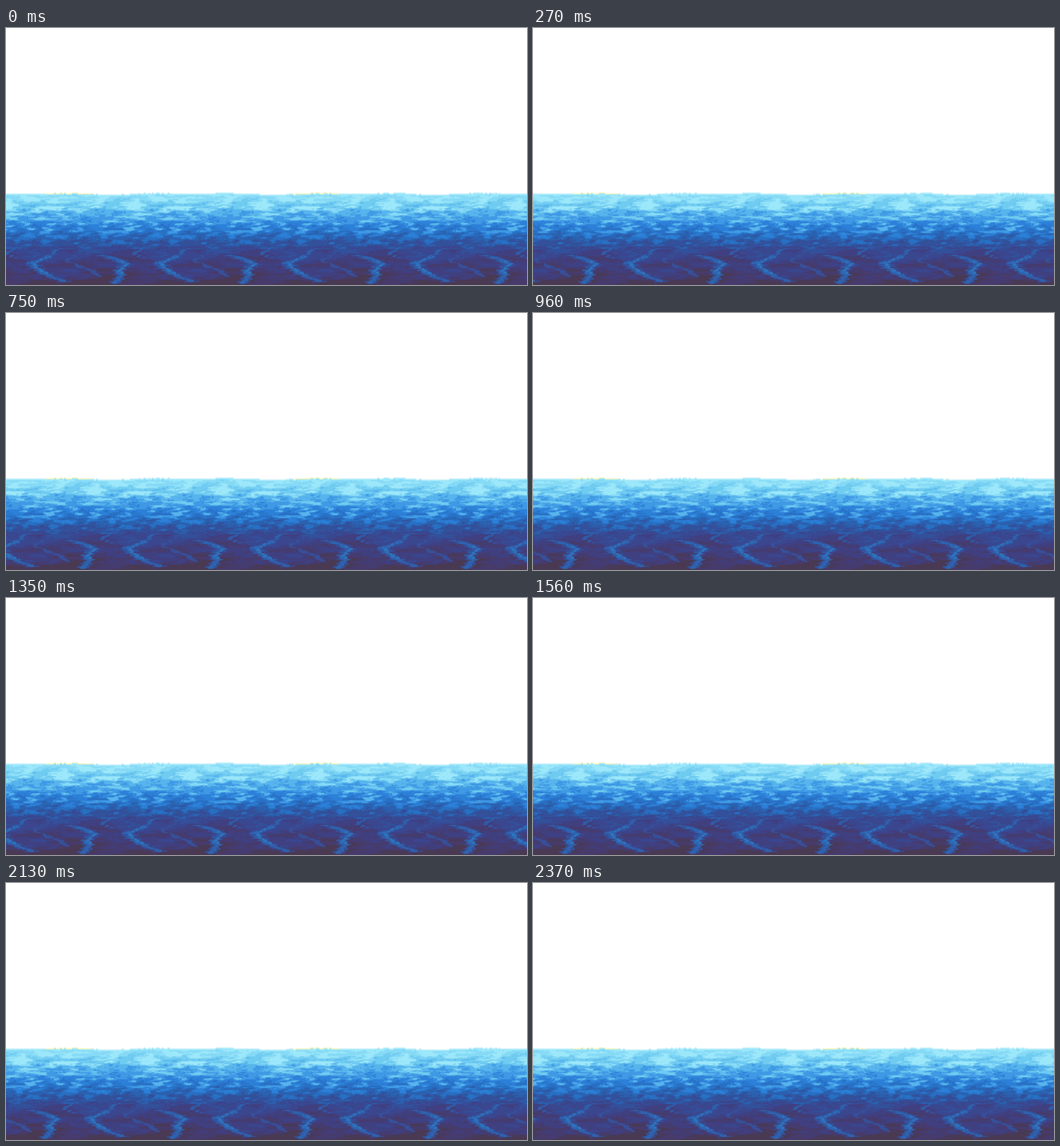
These frames come from a looping animation (700x346 px, 2.4 s). An HTML page with a canvas:

```html
<!DOCTYPE html>
<html lang="en">
<head>
<meta charset="utf-8">
<title>Sea</title>
<style>
  html, body { margin: 0; width: 100%; height: 100%; overflow: hidden; background: #fff; }
  canvas { display: block; width: 700px; height: 346px; }
</style>
</head>
<body>
<canvas id="sea" width="522" height="258"></canvas>
<script>
const W = 522, H = 258, TOP = 165, TILE = 128, ROWS = 93;
const LOOP = 2400, STEP = 30;
const ctx = document.getElementById('sea').getContext('2d');

// Shades from the surface down, each with the row where it is centred
const shades = ['#9ce8fa', '#86daf6', '#70cbf1', '#58b4ec', '#3f99e4', '#2c80d8',
  '#2870c4', '#2b60ae', '#33509b', '#3a468e', '#403f80', '#463b6b', '#493953'];
const centres = [-4, 5, 13, 20, 27, 34, 40, 45, 50, 58, 70, 84, 99];

// Bands of water: first row, last row, tiles travelled per loop
const bands = [[0, 24, 1], [24, 41, 2], [41, 54, 3], [54, ROWS, 4]];

function hash(x, y, seed) {
  const v = Math.sin(x * 127.1 + y * 311.7 + seed * 74.7) * 43758.5453;
  return v - Math.floor(v);
}

// Value noise that repeats every tile
function noise(x, y, cw, ch, seed) {
  const n = TILE / cw, u = x / cw, v = y / ch;
  const i = Math.floor(u), j = Math.floor(v);
  const ease = t => t * t * (3 - 2 * t);
  const a = ease(u - i), b = ease(v - j);
  const at = (p, q) => hash(((p % n) + n) % n, q, seed);
  const mix = (p, q, t) => p + (q - p) * t;
  return mix(mix(at(i, j), at(i + 1, j), a), mix(at(i, j + 1), at(i + 1, j + 1), a), b);
}

function depth(y) {
  let k = 0;
  while (k < centres.length - 2 && y >= centres[k + 1]) k++;
  return k + (y - centres[k]) / (centres[k + 1] - centres[k]);
}

function shadeAt(x, y) {
  const row = x + 5 * (hash(0, y, 6) - 0.5);
  let d = depth(y) + (noise(row, y, 4, 1.3, 1) - 0.5) * 0.8;
  if (y < 57) {
    // Small flecks of light that trail off sideways
    const bend = row + 6 * noise(x, y, 16, 4, 2) + y * 0.8;
    const fleck = noise(bend, y, 8, 2.4, 3) + (noise(row, y, 4, 1.2, 7) - 0.5) * 0.35;
    if (fleck > 0.7) d -= y < 40 ? 2 : 1.6;
    else if (fleck > 0.6) d -= 0.8;
    else if (fleck < 0.2) d += 0.7;
  } else {
    const bend = row + 14 * Math.sin(y / 7) + y;
    d += (noise(bend, y, 32, 6, 5) - 0.5) * 2.6 + (noise(bend, y, 8, 2, 8) - 0.5) * 1.4;
  }
  return Math.max(0, Math.min(shades.length - 1, Math.round(d)));
}

function makeTile() {
  const tile = document.createElement('canvas');
  tile.width = TILE;
  tile.height = ROWS;
  const g = tile.getContext('2d');
  for (let y = 0; y < ROWS; y++)
    for (let x = 0; x < TILE; x++) {
      g.fillStyle = shades[shadeAt(x, y)];
      g.fillRect(x, y, 1, 1);
    }

  // A ragged streak of dashes through points of [x, y, width]
  function streak(points, colour, seed, thick = 1) {
    g.fillStyle = colour;
    for (let k = 1; k < points.length; k++) {
      const [x0, y0, w0] = points[k - 1], [x1, y1, w1] = points[k];
      const slope = Math.abs((x1 - x0) / (y1 - y0));
      for (let y = y0; y < y1; y++) {
        const t = (y - y0) / (y1 - y0);
        const w = Math.round((w0 + (w1 - w0) * t + slope) * thick * (0.5 + hash(y, k, seed)));
        const x = Math.round(x0 + (x1 - x0) * t - w / 2 + 5 * (hash(y, k, 30) - 0.5));
        for (const shift of [-TILE, 0, TILE]) g.fillRect(x + shift, y, w, 1);
      }
    }
  }

  const wide = [[54, 56, 2], [42, 64, 3], [26, 71, 6], [31, 76, 6], [44, 83, 5], [60, 90, 3]];
  const tall = [[98, 63, 2], [112, 67, 5], [120, 71, 5], [113, 78, 6], [117, 83, 5], [106, 92, 4]];
  const faint = [[74, 60, 1], [61, 68, 3], [74, 74, 3], [88, 79, 4], [97, 85, 3]];
  const arc = [[142, 55, 1], [128, 61, 2], [137, 66, 1]];
  streak(faint, '#36509a', 20);
  streak(arc, '#305ba8', 24);
  for (const bolt of [wide, tall]) {
    streak(bolt, '#354f9a', 32, 1.7);
    streak(bolt, '#2e63ae', 34);
    streak(bolt.slice(1, 5), '#2f75bf', 38, 0.4);
  }
  return tile;
}

// Still surface line: white above, patches of yellow along the swell
function makeCrest() {
  const crest = document.createElement('canvas');
  crest.width = W;
  crest.height = 6;
  const g = crest.getContext('2d');
  const dot = (x, y, h, colour) => { g.fillStyle = colour; g.fillRect(x, y, 1, h); };
  for (let x = 0; x < W; x++) {
    const turn = (x - 104) / 82 * 2 * Math.PI;
    const ragged = hash(x >> 1, 1, 9) - 0.5;
    const y = Math.max(0, Math.round(1 + 0.6 * Math.cos(turn) + 0.4 * Math.cos(turn / 2) + ragged * 0.7));
    const gold = Math.cos((x - 60) / 256 * 2 * Math.PI) - Math.cos(turn) * 0.6;
    dot(x, 0, y, '#fff');
    dot(x, y, 1, gold > 0.75 ? '#f4f2bc' : '#c8f0fa');
    dot(x, y + 1, 1, '#98e6fa');
  }
  return crest;
}

const tile = makeTile(), crest = makeCrest();

function draw(now) {
  const steps = LOOP / STEP;
  const step = Math.floor((now % LOOP) / STEP);
  ctx.fillStyle = '#fff';
  ctx.fillRect(0, 0, W, H);
  for (const [from, to, laps] of bands) {
    const shift = Math.round(TILE * laps * step / steps) % TILE;
    for (let x = -shift; x < W; x += TILE)
      ctx.drawImage(tile, 0, from, TILE, to - from, x, TOP + from, TILE, to - from);
  }
  ctx.drawImage(crest, 0, TOP);
}

const start = performance.now();
function tick() {
  draw(performance.now() - start);
  requestAnimationFrame(tick);
}
tick();
</script>
</body>
</html>
```
